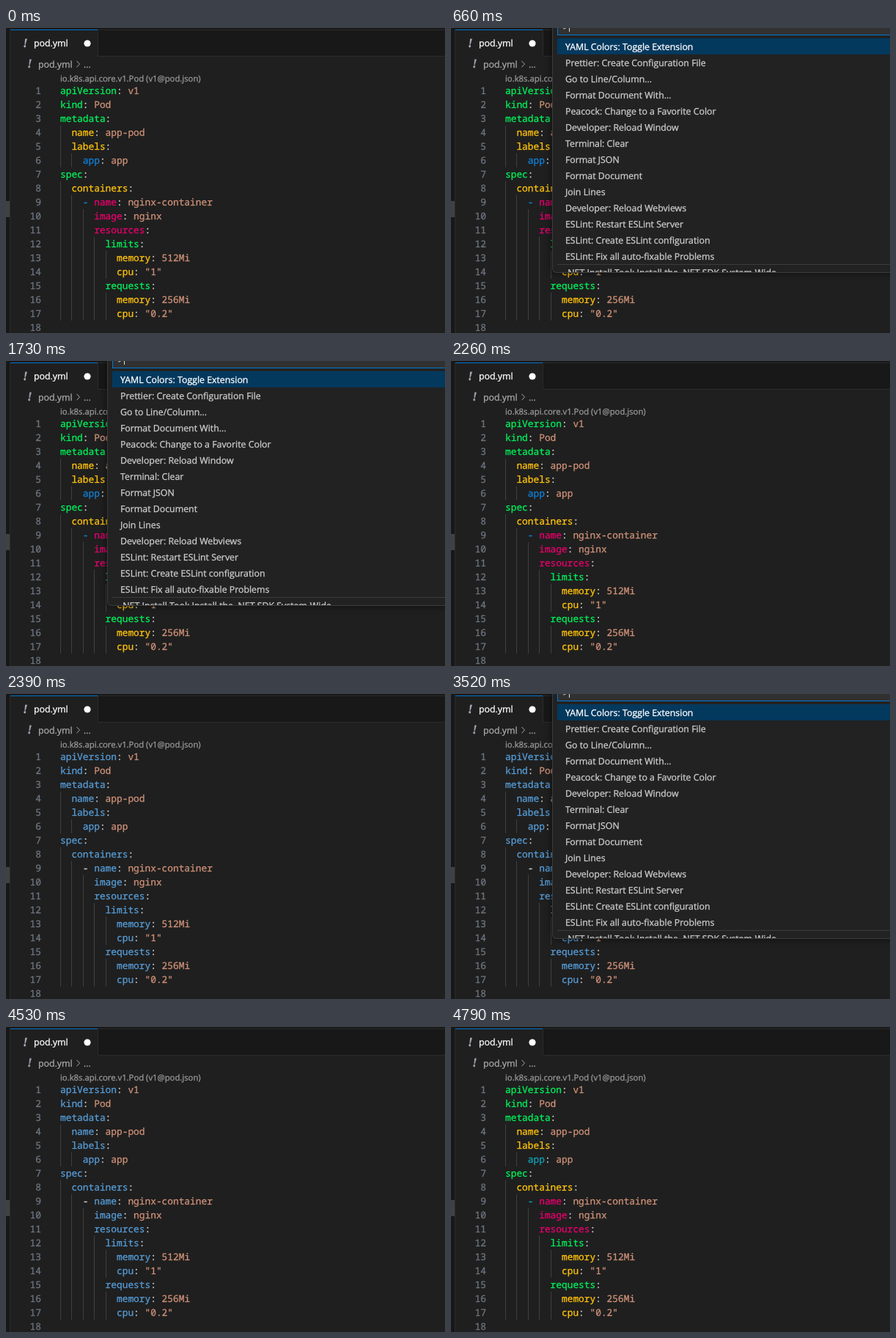
An HTML page with a canvas for the animation above (4.99 s loop, 599 px wide and 416 px high).

```html
<!DOCTYPE html>
<html lang="en">
<head>
<meta charset="utf-8">
<title>pod.yml</title>
<style>
html, body { margin: 0; width: 100%; height: 100%; overflow: hidden; background: #1f1f1f; }
canvas { display: block; }
</style>
</head>
<body>
<canvas id="stage" width="599" height="416"></canvas>
<script>
const ctx = document.getElementById('stage').getContext('2d');
const LOOP = 4990, LEFT = 74, CHAR = 7.7, ROW = 19;
const UI = '12.35px "Open Sans", sans-serif';
const LENS = '11.3px "Open Sans", sans-serif';
const MONO = '12.83px "Noto Sans Mono", monospace';
const ICON = 'italic bold 17px "Liberation Serif", serif';
const PLAIN = '#569cd6', TEXT = '#cccccc', VALUE = '#ce9178', ACCENT = '#0078d4';

const yaml = `apiVersion: v1
kind: Pod
metadata:
  name: app-pod
  labels:
    app: app
spec:
  containers:
    - name: nginx-container
      image: nginx
      resources:
        limits:
          memory: 512Mi
          cpu: "1"
        requests:
          memory: 256Mi
          cpu: "0.2"
`.split('\n');

const commands = [
  'YAML Colors: Toggle Extension', 'Prettier: Create Configuration File',
  'Go to Line/Column...', 'Format Document With...',
  'Peacock: Change to a Favorite Color', 'Developer: Reload Window',
  'Terminal: Clear', 'Format JSON', 'Format Document', 'Join Lines',
  'Developer: Reload Webviews', 'ESLint: Restart ESLint Server',
  'ESLint: Create ESLint configuration', 'ESLint: Fix all auto-fixable Problems',
  '.NET Install Tool: Install the .NET SDK System-Wide.'
];

function rect(x, y, w, h, color) {
  ctx.fillStyle = color;
  ctx.fillRect(x, y, w, h);
}

// A hairline stroke gives the slightly heavier weight of hinted screen text.
function text(str, x, y, color, font = UI, align = 'left') {
  ctx.font = font;
  ctx.textAlign = align;
  ctx.fillStyle = ctx.strokeStyle = color;
  ctx.lineWidth = 0.3;
  ctx.fillText(str, x, y);
  ctx.strokeText(str, x, y);
}

function drawFrame() {
  rect(0, 0, 599, 416, '#1f1f1f');
  rect(0, 0, 5, 416, '#181818');
  rect(0, 0, 599, 2, '#181818');
  rect(125, 3, 474, 35, '#181818');
  rect(5, 2, 1, 414, '#2b2b2b');
  rect(5, 2, 594, 1, '#2b2b2b');
  rect(6, 2, 119, 1, ACCENT);
  rect(125, 2, 1, 37, '#2b2b2b');
  rect(125, 38, 474, 1, '#2b2b2b');
  rect(0, 236, 5, 22, '#414141');

  text('!', 23, 26, '#b3a9bd', ICON);
  text('pod.yml', 38, 25, '#ffffff');
  ctx.beginPath();
  ctx.arc(111, 21, 4.6, 0, 7);
  ctx.fill();

  text('!', 29, 54, '#a59dae', ICON);
  text('pod.yml', 44, 54, '#a9a9a9');
  text('...', 106, 54, '#a9a9a9');
  ctx.lineWidth = 1;
  ctx.beginPath();
  ctx.moveTo(96.5, 45);
  ctx.lineTo(100.5, 49.2);
  ctx.lineTo(96.5, 53.4);
  ctx.stroke();
  text('io.k8s.api.core.v1.Pod (v1@pod.json)', LEFT, 73, '#999999', LENS);
}

// Each indent level takes the next palette colour; no palette means plain keys.
function drawCode(palette) {
  yaml.forEach((line, row) => {
    const y = 90 + row * ROW;
    text(row + 1, 48, y, '#6e7681', MONO, 'right');
    const [, pad, dash, key, value] = line.match(/^( *)(- )?(\w*):?(.*)$/);
    const level = pad.length / 2;
    for (let i = 0; i < level; i++) {
      rect(LEFT + Math.round(i * 2 * CHAR), y - 14, 1, ROW, '#404040');
    }
    if (!key) return;
    let col = pad.length;
    const put = (str, color) => {
      text(str, LEFT + col * CHAR, y, color, MONO);
      col += str.length;
    };
    if (dash) put(dash, palette ? palette[level % 4] : TEXT);
    put(key, palette ? palette[(col / 2) % 4] : PLAIN);
    put(':', TEXT);
    put(value, VALUE);
  });
}

function drawMenu(cursor) {
  ctx.save();
  ctx.shadowColor = 'rgba(0,0,0,.6)';
  ctx.shadowBlur = 10;
  ctx.fillStyle = '#3c3c3c';
  ctx.beginPath();
  ctx.roundRect(138, -20, 480, 354, 6);
  ctx.fill();
  ctx.restore();

  ctx.save();
  ctx.beginPath();
  ctx.roundRect(139, -20, 480, 353, 5);
  ctx.clip();
  rect(138, 0, 461, 334, '#222222');
  rect(145, 0, 454, 9, '#313131');
  rect(145, 9, 454, 1, ACCENT);
  rect(145, 0, 1, 9, ACCENT);
  text('>', 153, 2.5, TEXT);
  if (cursor) rect(161, 0, 1, 5, '#dddddd');
  rect(145, 14, 454, 22, '#04395e');
  rect(145, 322, 454, 1, '#3c3c3c');
  commands.forEach((name, i) => text(name, 156, 30 + i * 22, i ? TEXT : '#ffffff'));
  ctx.restore();
}

function draw(now) {
  const t = now % LOOP;
  const within = (from, to) => t >= from && t < to;
  const third = t < 2390 ? '#0f80d8' : '#10a0b4';
  const colored = !within(2390, 4790);
  ctx.textRendering = 'geometricPrecision';
  drawFrame();
  drawCode(colored && ['#00f05a', '#ffc20a', third, '#e6006c']);
  if (within(660, 2260) || within(3520, 4530)) {
    drawMenu(!within(1200, 1730) && !within(4060, 4530));
  }
}

function tick() {
  draw(performance.now());
  requestAnimationFrame(tick);
}
tick();
</script>
</body>
</html>
```
